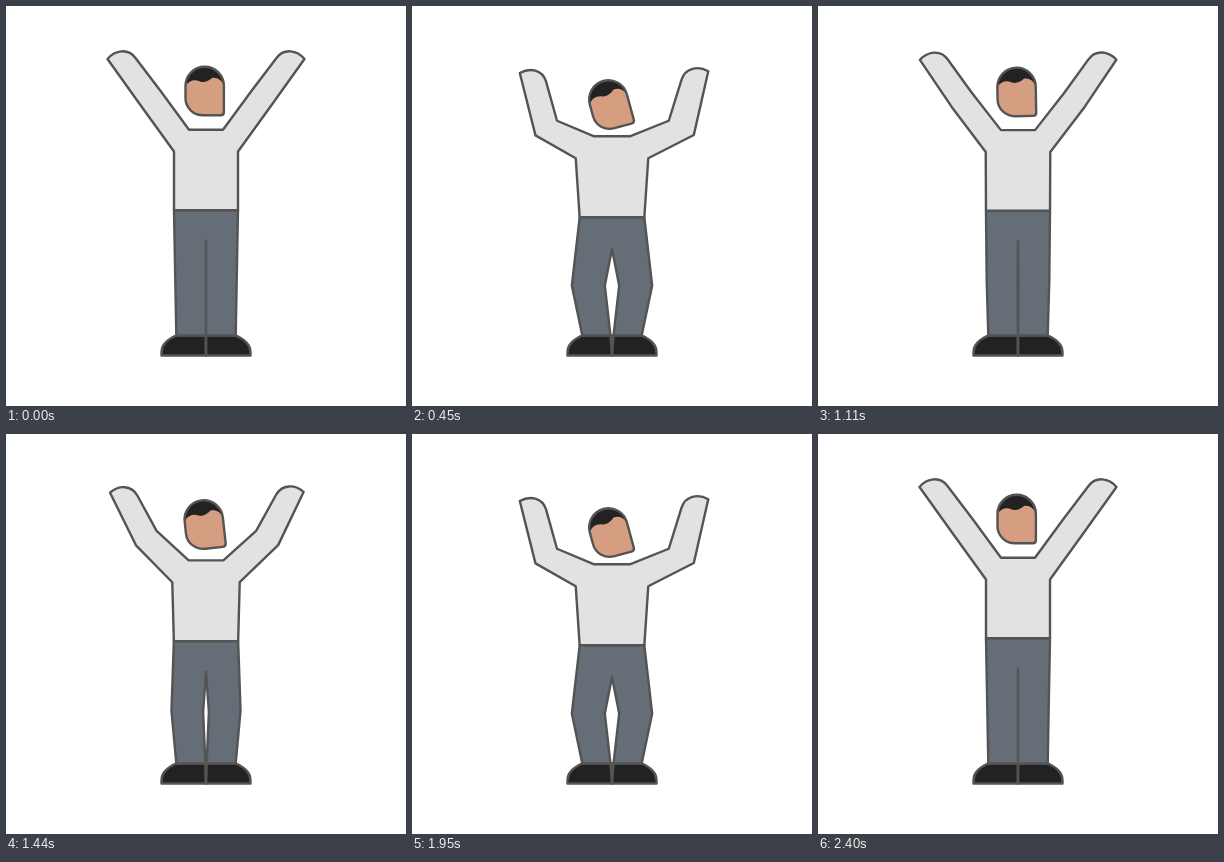
These frames come from a looping animation (400x400 px, 2430 ms). An HTML page:

```html
<!DOCTYPE html>
<html lang="en">
<head>
<meta charset="utf-8">
<title>Cheering man</title>
<style>
  html, body { margin: 0; height: 100%; overflow: hidden; background: #fff; }
  svg { display: block; width: 100vw; height: 100vh; }
</style>
</head>
<body>
<svg viewBox="0 0 400 400" stroke="#545454" stroke-width="2.4" stroke-linejoin="round" stroke-linecap="round">
  <g fill="#222">
    <path id="shoe" d="M200 329.5H170Q155.5 336 155.5 346V349.5H200Z"/>
    <use href="#shoe" transform="matrix(-1 0 0 1 400 0)"/>
  </g>
  <path id="seam" fill="#545454"/>
  <path id="pants" fill="#656d77"/>
  <path id="shirt" fill="#e2e2e2"/>
  <g id="head">
    <path fill="#d59e80" stroke="none" d="M179.5 80a19.2 19.2 0 0 1 38.4 0V106q0 3.3-3.3 3.3H197a17.5 17 0 0 1-17.5-17Z"/>
    <path fill="#222" stroke="none" d="M179.5 80a19.2 19.2 0 0 1 38.4 0C216 74 211 71 206 72C203 75 198 77 194 75.5C189 73 183 74 179.5 80Z"/>
    <path fill="none" d="M179.5 80a19.2 19.2 0 0 1 38.4 0V106q0 3.3-3.3 3.3H197a17.5 17 0 0 1-17.5-17Z"/>
  </g>
</svg>
<script>
const LOOP = 2430, STEP = 30, CYCLE = 1200;
const $ = id => document.getElementById(id);

// Each joint: x, y with arms raised, then x, y when crouched.
const arms = {
  left: {
    armpit: [168, 145.5, 163, 153.4],
    outerElbow: [134.4, 99, 121.6, 134.6],
    hand: [[101.5, 53, 108.9, 69.4], [109, 44, 119.5, 64.2], [122, 42, 131.9, 67.4], [129.5, 52, 134.8, 79.5]],
    innerElbow: [154.4, 84.8, 143.4, 119.9],
    shoulder: [183, 123.7, 182, 131.4]
  },
  right: {
    armpit: [232, 145.5, 237, 153.4],
    outerElbow: [265.6, 99, 284.6, 134.1],
    hand: [[298.5, 53, 295.9, 67.3], [291, 44, 285.3, 62.1], [278, 42, 272.3, 65.2], [270.5, 52, 269.4, 77.4]],
    innerElbow: [245.6, 84.8, 258.7, 119.9],
    shoulder: [217, 123.7, 218, 131.4]
  }
};
const waist = [168, 204.3, 167.6, 212.5];
const outerKnee = [169.3, 274.6, 158.2, 280.4];
const outerAnkle = [170.3, 329.5, 170.3, 329.5];
const innerAnkle = [200, 329.5, 198.2, 329.5];
const innerKnee = [200, 277, 191.6, 280];
const crotch = [200, 234.5, 200, 244.5];

const mirror = ([x0, y0, x1, y1]) => [400 - x0, y0, 400 - x1, y1];
const mix = (a, b, k) => a + (b - a) * k;

function draw(time) {
  const t = Math.floor(time % LOOP / STEP) * STEP;
  const k = (1 - Math.cos(2 * Math.PI * t / CYCLE)) / 2;
  const at = ([x0, y0, x1, y1]) => mix(x0, x1, k).toFixed(2) + ' ' + mix(y0, y1, k).toFixed(2);
  const line = points => points.map(at).join('L');
  const cap = points => points.map(at).join(' ');
  const { left, right } = arms;

  const leftHand = left.hand, rightHand = [...right.hand].reverse();
  $('shirt').setAttribute('d',
    'M' + line([waist, left.armpit, left.outerElbow, leftHand[0]]) +
    'C' + cap(leftHand.slice(1)) +
    'L' + line([left.innerElbow, left.shoulder, right.shoulder, right.innerElbow, rightHand[0]]) +
    'C' + cap([rightHand[1], rightHand[2], rightHand[3]]) +
    'L' + line([right.outerElbow, right.armpit, mirror(waist)]) + 'Z');

  const leg = [waist, outerKnee, outerAnkle, innerAnkle, innerKnee];
  $('pants').setAttribute('d', 'M' + line([...leg, crotch, ...leg.map(mirror).reverse()]) + 'Z');
  $('seam').setAttribute('d', 'M' + at(innerAnkle) + 'L200 349L' + at(mirror(innerAnkle)));
  $('head').setAttribute('transform', `translate(${-2.6 * k} ${15.7 * k}) rotate(${-18 * k} 199 80.5)`);
}

function tick() {
  draw(performance.now());
  requestAnimationFrame(tick);
}
tick();
</script>
</body>
</html>
```
